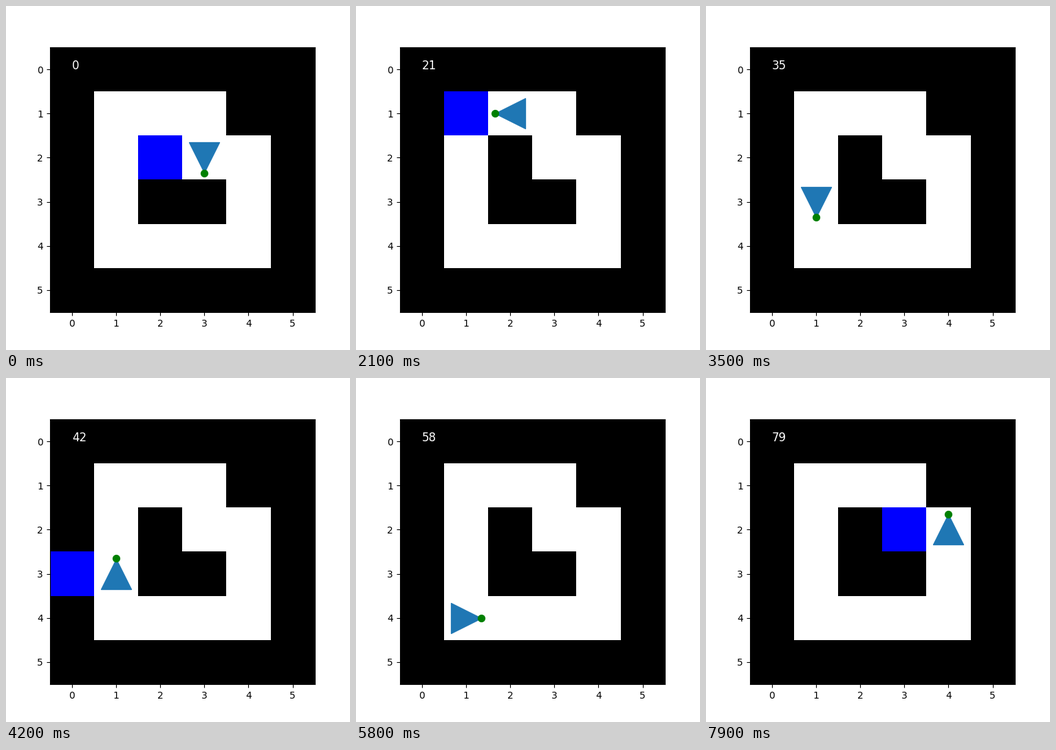
A matplotlib script for the animation above (8 s loop, 500 px wide and 500 px high).

```python
import numpy as np
import matplotlib.pyplot as plt
from matplotlib.animation import FuncAnimation
from matplotlib.colors import ListedColormap
from matplotlib.markers import MarkerStyle

FREE, WALL, FELT = 0, 1, 2
MAZE = np.array([[int(c) for c in row] for row in
                 ("111111", "100011", "101001", "101101", "100001", "111111")])

# Headings clockwise from up, as (column, row) offsets
HEADINGS = ((0, -1), (1, 0), (0, 1), (-1, 0))
MARKERS = "^>v<"
START = (3, 2, 2)

# F forward, L/R turn; f/l/r feel the cell in front, to the left, to the right
ACTIONS = ("rfrfRfrRflrFfl" "LfrFlrlfFfrlfr" "LrlfFlrFRflrRf" "lFflrflLLfFflF"
           "flLfFrfFrfFrfl" "rLrfFrfFfl")
SIDES = {"f": 0, "r": 1, "l": -1}


def run(actions):
    """Return (x, y, heading, felt cell or None) after every action."""
    x, y, head = START
    states = []
    for act in actions:
        felt = None
        if act == "F":
            dx, dy = HEADINGS[head]
            x, y = x + dx, y + dy
        elif act in "LR":
            head = (head + (1 if act == "R" else -1)) % 4
        else:
            dx, dy = HEADINGS[(head + SIDES[act]) % 4]
            felt = (x + dx, y + dy)
        states.append((x, y, head, felt))
    return states


def marker_path(symbol):
    style = MarkerStyle(symbol)
    return style.get_path().transformed(style.get_transform())


STATES = run(ACTIONS)
PATHS = [marker_path(m) for m in MARKERS]

fig, ax = plt.subplots(figsize=(5, 5), dpi=100)
image = ax.imshow(MAZE, cmap=ListedColormap(["white", "black", "blue"]),
                  vmin=FREE, vmax=FELT)
agent = ax.scatter(0, 0, s=1000, color="tab:blue")
eye = ax.scatter(0, 0, s=50, color="green")
label = ax.text(0, 0, "", fontsize=12, color="white")
ax.set(xlim=(-0.5, 5.5), ylim=(5.5, -0.5), xticks=range(6), yticks=range(6))


def draw(step):
    x, y, head, felt = STATES[step]
    grid = MAZE.copy()
    if felt:
        grid[felt[1], felt[0]] = FELT
    image.set_data(grid)
    dx, dy = HEADINGS[head]
    agent.set_paths([PATHS[head]])
    agent.set_offsets([(x, y)])
    eye.set_offsets([(x + 0.35 * dx, y + 0.35 * dy)])
    label.set_text(str(step))
    return image, agent, eye, label


anim = FuncAnimation(fig, draw, frames=len(STATES), interval=100,
                     repeat=True, repeat_delay=0)
plt.show()
```
